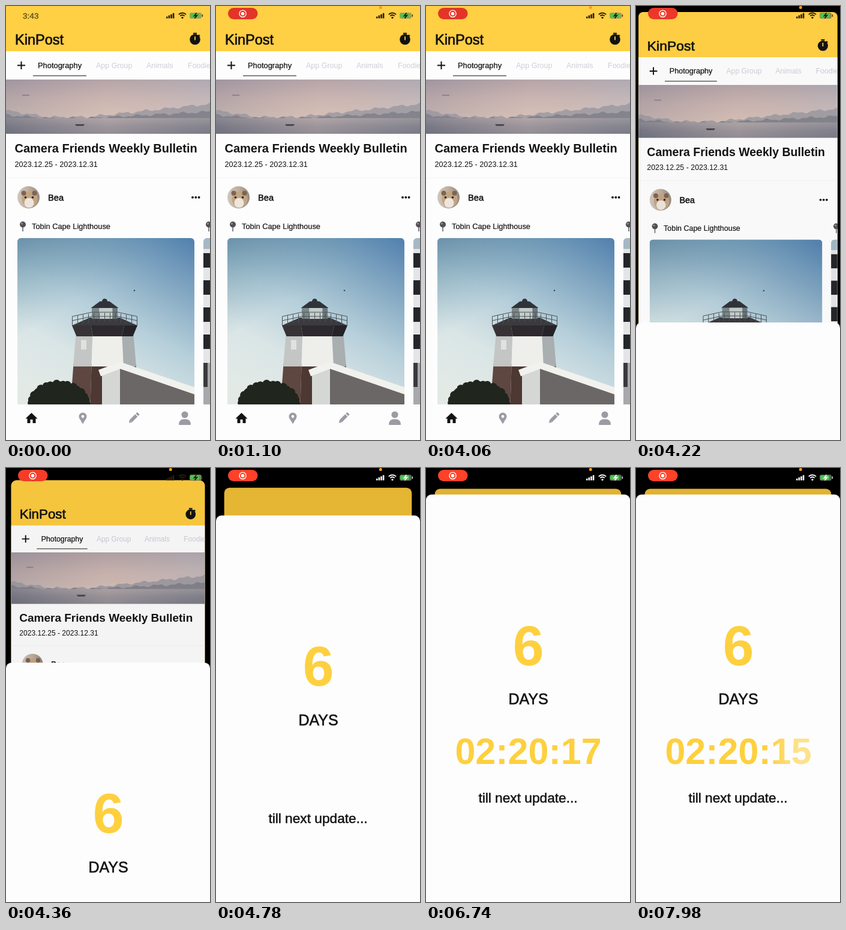
Animation, 340 px wide and 720 px high, one loop 8000 ms. Source, as an HTML page with a canvas:

```html
<!DOCTYPE html>
<html lang="en">
<head>
<meta charset="utf-8">
<title>Countdown sheet</title>
<style>
html, body { margin: 0; width: 100%; height: 100%; overflow: hidden; background: #000; }
canvas { display: block; width: 340px; height: 720px; }
</style>
</head>
<body>
<canvas id="stage"></canvas>
<script>
const W = 340, H = 720, LOOP = 8000;
const FONT = '"Liberation Sans", Arial, sans-serif';
const PAPER = '#fdfdfe', INK = '#121212', GOLD = '#fed03f', GREY = '#9c9ba3';
const SHEET_START = 4057, SHEET_TOP = 44, SPRING = 6.5;
const FIRST_TICK = 5900, FIRST_SECOND = 17;

const canvas = document.getElementById('stage');
const dpr = window.devicePixelRatio || 1;
canvas.width = W * dpr;
canvas.height = H * dpr;
const c = canvas.getContext('2d');

const ramp = (t, from, to) => Math.max(0, Math.min(1, (t - from) / (to - from)));
const mix = (a, b, k) => `rgb(${a.map((v, i) => Math.round(v + (b[i] - v) * k)).join(',')})`;

// Critically damped spring, 0 to 1
function sheetProgress(t) {
  const x = Math.max(0, t - SHEET_START) / 1000 * SPRING;
  return 1 - (1 + x) * Math.exp(-x);
}

function rect(x, y, w, h, color) {
  c.fillStyle = color;
  c.fillRect(x, y, w, h);
}

function round(x, y, w, h, r, color) {
  c.beginPath();
  c.roundRect(x, y, w, h, r);
  c.fillStyle = color;
  c.fill();
}

function clipped(x, y, w, h, r, paint) {
  c.save();
  c.beginPath();
  c.roundRect(x, y, w, h, r);
  c.clip();
  paint();
  c.restore();
}

function disc(x, y, r, color) {
  c.beginPath();
  c.arc(x, y, r, 0, 7);
  c.fillStyle = color;
  c.fill();
}

function trace(pts) {
  c.beginPath();
  for (let i = 0; i < pts.length; i += 2) c.lineTo(pts[i], pts[i + 1]);
}

function poly(color, ...pts) {
  trace(pts);
  c.fillStyle = color;
  c.fill();
}

function line(color, width, ...pts) {
  trace(pts);
  c.strokeStyle = color;
  c.lineWidth = width;
  c.stroke();
}

// Upright trapezoid around x, cut at fractions of its width into shaded faces
function prism(x, y, top, bottom, h, ...shades) {
  const cuts = shades.length === 1 ? [-.5, .5] : [-.5, -.21, .3, .5];
  shades.forEach((shade, i) => {
    const a = cuts[i], b = cuts[i + 1];
    poly(shade, x + a * top, y, x + b * top, y, x + b * bottom, y + h, x + a * bottom, y + h);
  });
}

function gradient(x0, y0, x1, y1, ...colors) {
  const g = c.createLinearGradient(x0, y0, x1, y1);
  colors.forEach((v, i) => g.addColorStop(i / (colors.length - 1), v));
  return g;
}

// "heft" thickens regular text to a medium weight
function text(str, x, y, size, { color = INK, bold = false, heft = 0, align = 'left' } = {}) {
  c.font = `${bold ? 'bold ' : ''}${size}px ${FONT}`;
  c.textAlign = align;
  c.fillStyle = color;
  c.fillText(str, x, y);
  if (!heft) return;
  c.strokeStyle = color;
  c.lineWidth = heft;
  c.strokeText(str, x, y);
}

function stopwatch(x, y) {
  disc(x, y, 8.8, INK);
  rect(x - 3, y - 11, 6, 2.2, INK);
  line(INK, 2.2, x + 5.5, y - 7.5, x + 8, y - 5.5);
  line(GOLD, 1.8, x, y - 5, x, y + 1);
}

// A ridge whose height swells towards both ends of the picture
function hills(base, rise, phase, color) {
  c.beginPath();
  c.moveTo(0, base);
  for (let x = 0; x <= W; x += 4) {
    const u = x / W;
    const height = rise * (Math.max(0, .45 - 2.2 * u) + Math.max(0, u - .4) * 1.5);
    c.lineTo(x, base - 4 - height - 1.5 * Math.sin(x * .17 + phase) - Math.sin(x * .41));
  }
  c.lineTo(W, base);
  c.fillStyle = color;
  c.fill();
}

function banner() {
  rect(0, 122, W, 90, gradient(0, 122, 0, 186, '#a79ca6', '#c4b2b1', '#d3c1ba'));
  rect(0, 122, W, 90, gradient(0, 0, W, 0, 'rgba(145,135,145,.3)', 'rgba(225,190,175,.25)', 'rgba(190,190,198,.4)'));
  hills(188, 24, 0, 'rgba(150,149,158,.75)');
  hills(190, 12, 2, 'rgba(120,121,132,.7)');
  rect(0, 186, W, 26, gradient(0, 186, 0, 212, '#a39ca2', '#85848f', '#767784'));
  rect(0, 186, W, 26, gradient(0, 0, W, 0, 'rgba(100,103,118,.4)', 'rgba(205,185,180,.35)', 'rgba(130,132,142,.3)'));
  prism(123, 196, 16, 12, 3, '#4a4850');
  rect(27, 147, 12, 2, '#8d838d');
}

function avatar(x, y) {
  clipped(x - 18.5, y - 18.5, 37, 37, 18.5, () => {
    rect(x - 19, y - 19, 38, 38, gradient(x - 19, y, x + 19, y, '#d2c8bf', '#bfae9c', '#94887e'));
    disc(x + 2, y + 3, 13, '#c2a583');
    for (const side of [-1, 1]) {
      disc(x + 1 + side * 9, y - 7, 4, '#7d6552');
      disc(x + 1 + side * 6, y, 1.8, '#2a2420');
    }
    disc(x + 1, y + 9, 8, '#eee6dd');
  });
}

function pushpin(x) {
  line('#77777a', 1.8, x, 365, x, 374);
  disc(x, 362.5, 5, '#505054');
  disc(x - 1.5, 361, 1.6, '#949498');
}

function lighthouse() {
  const x = 164.5;
  rect(19, 385, 295, 276, gradient(270, 370, 110, 670, '#5583af', '#86aac3', '#b6cfda', '#d9e5e6', '#e3eae6'));
  rect(19, 385, 295, 276, gradient(19, 385, 90, 510, 'rgba(70,115,145,.6)', 'rgba(110,155,175,0)'));
  disc(214, 472, 1.3, '#3d4a55');

  prism(x, 594, 104, 114, 67, '#5e4740', '#4d3833', '#3f302d');
  prism(x, 545, 96, 105, 53, '#c3c6c4', '#eeeeea', '#a9aeb0');
  prism(129.5, 554, 9, 9, 16, '#dfe2df');

  // Gallery, lantern and cap
  prism(x, 517, 50, 109, 13, '#3b3a3e');
  prism(x, 530, 109, 94, 18, '#373235', '#2d292c', '#252328');
  prism(x, 500, 43, 43, 19, '#7b8788', '#c3cdca', '#6e777b');
  prism(x, 490, 16, 46, 11, '#30343a');
  disc(x, 490, 4.5, '#30343a');
  for (let i = 0; i <= 12; i++) {
    const u = i / 6 - 1, lift = 6 * (1 - u * u);
    line('#4b5054', 1, x + u * 54, 515 - lift, x + u * 54, 530 - lift);
  }
  for (const y of [515, 522]) line('#4b5054', 1, x - 54, y, x - 22, y - 7, x + 22, y - 7, x + 54, y);

  // Wall with a white coping
  poly('#d5d7d4', 160, 612, 190, 600, 190, 661, 160, 661);
  poly('#6b6766', 190, 600, 314, 642, 314, 661, 190, 661);
  line('#f1f1ed', 11, 156, 609, 190, 596, 316, 639);

  // Bush
  for (let i = 0; i <= 40; i++) {
    const a = Math.PI * i / 40, r = 4 + 3 * Math.sin(i * 2.4);
    disc(88 - 46 * Math.cos(a), 661 - 34 * Math.sin(a), r, '#20251d');
  }
  c.beginPath();
  c.ellipse(88, 661, 47, 36, 0, Math.PI, 0);
  c.fill();
}

function nextCard() {
  rect(329, 385, 11, 276, '#e4e5e6');
  rect(329, 385, 11, 18, '#a5b8c4');
  for (let y = 410; y < 590; y += 45) rect(329, y, 11, 24, '#25262a');
  rect(329, 592, 11, 69, '#a8a9ac');
  rect(329, 592, 7, 40, '#3a3a3e');
}

function tabBar() {
  rect(0, 661, W, 59, PAPER);
  prism(42.5, 675, 0, 20, 9.5, INK);
  rect(35.5, 682, 14, 10, INK);
  rect(40.5, 686, 4, 6, PAPER);

  disc(128, 681, 6.5, GREY);
  prism(128, 683, 12.4, 0, 10.5, GREY);
  disc(128, 681, 2.4, PAPER);

  c.save();
  c.translate(213, 683.5);
  c.rotate(Math.PI / 4);
  rect(-2.8, -6, 5.6, 13, GREY);
  prism(0, 7, 5.6, 0, 4.5, GREY);
  round(-2.8, -11, 5.6, 3.6, 1, GREY);
  c.restore();

  disc(298, 678, 5.6, GREY);
  round(288, 685.5, 20, 9.5, [8, 8, 1, 1], GREY);
}

function home() {
  rect(0, 75, W, H - 75, PAPER);
  text('KinPost', 15, 63.5, 23.5, { heft: .7 });
  stopwatch(315, 55.5);
  line(INK, 2, 19, 98.5, 32, 98.5);
  line(INK, 2, 25.5, 92, 25.5, 105);
  text('Photography', 53, 103, 12.9, { heft: .25 });
  const pale = { color: '#cfced8' };
  text('App Group', 150, 103, 12.5, pale);
  text('Animals', 234, 103, 12.5, pale);
  text('Foodies', 303, 103, 12.5, pale);
  rect(45, 115, 89, 1.4, '#55544c');
  clipped(0, 122, W, 90, 0, banner);
  text('Camera Friends Weekly Bulletin', 14.5, 243, 20, { bold: true });
  text('2023.12.25 - 2023.12.31', 14.5, 267, 12.7);
  rect(0, 284.5, W, 1, '#f3f3f5');
  avatar(37.5, 317.5);
  text('Bea', 70, 323, 14.7, { heft: .5 });
  for (let i = 0; i < 3; i++) disc(311 + i * 5.3, 317.5, 1.9, INK);
  pushpin(28);
  pushpin(338);
  text('Tobin Cape Lighthouse', 43, 370, 12.8, { heft: .2 });
  clipped(19, 385, 295, 290, 6, lighthouse);
  clipped(329, 385, 60, 290, 6, nextCard);
  tabBar();
}

// Home page pushed back as a card behind the sheet
function backdrop(p) {
  const scale = 1 - .085 * p, left = W * (1 - scale) / 2, top = 34.5 * p;
  clipped(left, top, W * scale, H, 9 * Math.min(1, p * 3), () => {
    rect(0, 0, W, H, mix([255, 207, 68], [226, 178, 50], p * p));
    c.save();
    c.translate(left, 41 * p);
    c.scale(scale, scale);
    home();
    c.restore();
    rect(0, 41 * p + 75 * scale, W, H, `rgba(0,0,0,${.06 * p})`);
  });
}

function countdown(t, top) {
  if (t < FIRST_TICK) return;
  const ticks = (t - FIRST_TICK) / 1000;
  const second = FIRST_SECOND - Math.floor(ticks);
  const fade = .35 + .65 * ramp(ticks % 1, 0, .21);
  const color = gradient(222, 0, 270, 0, GOLD, `rgba(254,208,63,${fade})`);
  text(`02:20:${second}`, 170.5, top + 447, 61, { color, bold: true, align: 'center' });
}

function sheet(t, p) {
  const top = H - (H - SHEET_TOP) * p;
  round(0, top, W, H, 9, PAPER);
  text('6', 170.5, top + 282.5, 93, { color: GOLD, bold: true, align: 'center' });
  text('DAYS', 170.5, top + 348, 25, { heft: .6, align: 'center' });
  countdown(t, top);
  text('till next update...', 170, top + 510.5, 22.7, { heft: .5, align: 'center' });
}

function statusBar(t, p) {
  const light = ramp(t, 4400, 4720);
  const ink = mix([40, 32, 12], [248, 248, 248], light);
  const rec = ramp(t, 200, 500);
  c.globalAlpha = 1 - rec;
  text('3:43', 28, 20.5, 13.6, { color: '#5c4b1c', heft: .3 });
  c.globalAlpha = rec;
  round(20, 3, 49.5, 19, 9.5, mix([228, 52, 40], [255, 66, 40], p));
  c.beginPath();
  c.arc(44.5, 12.7, 5.6, 0, 7);
  c.strokeStyle = '#fff';
  c.lineWidth = 1.4;
  c.stroke();
  disc(44.5, 12.7, 2.8, '#fff');
  disc(274.3, 2.5, 2.5, '#f79a20');
  c.globalAlpha = 1;

  for (let i = 0; i < 4; i++) round(267 + i * 3.6, 17.5 - i * 1.9, 2.6, 3 + i * 1.9, .6, ink);
  c.strokeStyle = ink;
  c.lineWidth = 1.8;
  for (const r of [5, 8.5]) {
    c.beginPath();
    c.arc(294, 20, r, -Math.PI * .76, -Math.PI * .24);
    c.stroke();
  }
  disc(294, 19.3, 1.6, ink);
  round(306, 11, 20, 10, 3, mix([158, 160, 90], [80, 104, 80], p));
  round(307.2, 12.2, 15, 7.6, 2, '#4fc354');
  round(326.7, 14, 1.4, 4, .7, ink);
  line(ink, 2, 317.5, 11.5, 313.8, 16.4, 318.2, 15.6, 314.5, 20.5);
}

function draw(t) {
  c.setTransform(dpr, 0, 0, dpr, 0, 0);
  rect(0, 0, W, H, '#000');
  const p = sheetProgress(t);
  backdrop(p);
  if (p > 0) sheet(t, p);
  statusBar(t, p);
}

const start = performance.now();
function loop() {
  draw((performance.now() - start) % LOOP);
  requestAnimationFrame(loop);
}
loop();
</script>
</body>
</html>
```
